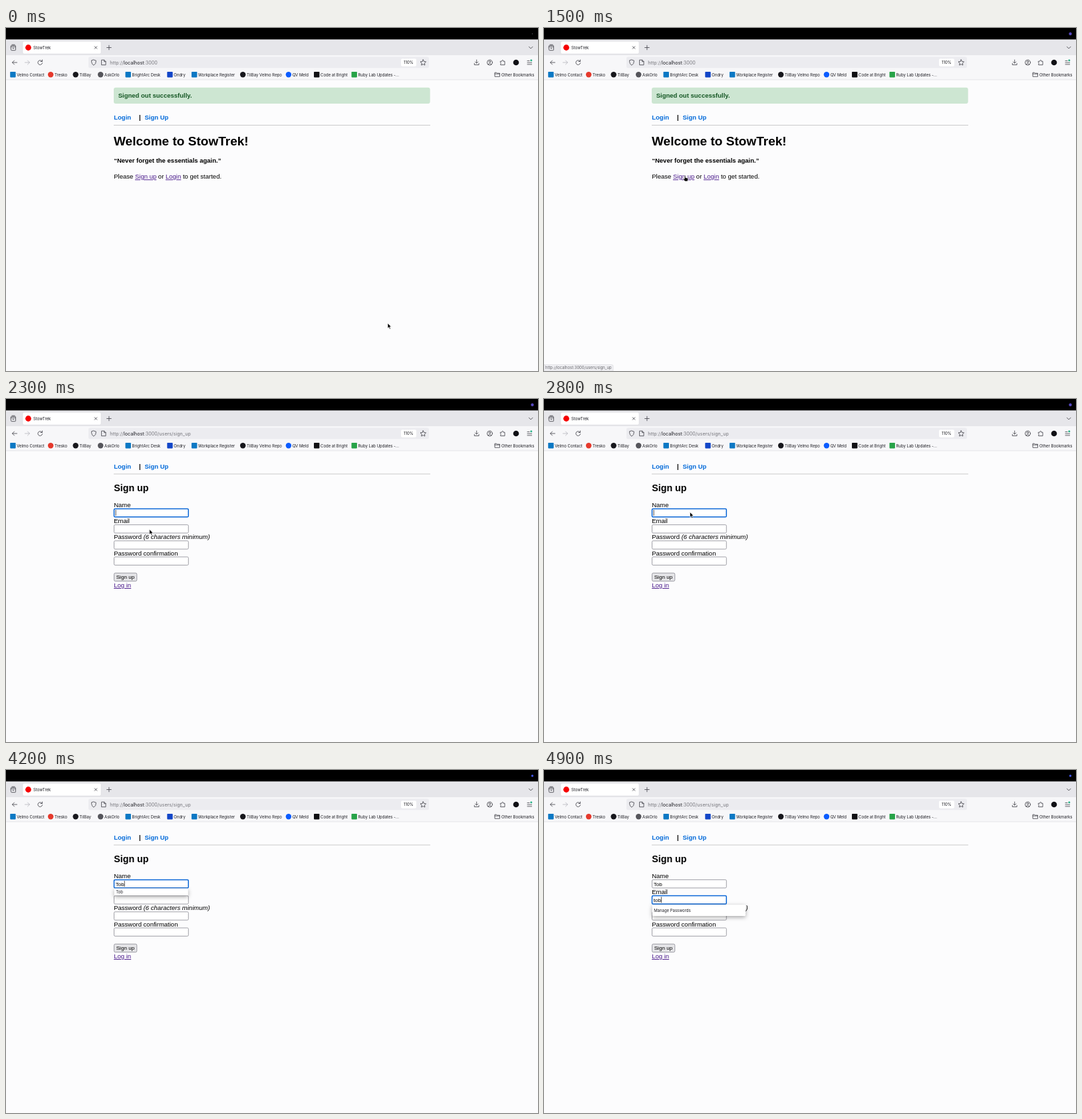
Write an HTML page that moves like this. It is 800 by 517 pixels and loops after 5 s.

```html
<!DOCTYPE html>
<html lang="en">
<head>
<meta charset="utf-8">
<title>StowTrek</title>
<style>
  html, body { margin: 0; width: 100%; height: 100%; overflow: hidden; background: #fcfcfd; }
  svg { display: block; width: 800px; height: 517px; }
  text { white-space: pre; }
  .ui { font: 6px Inter, sans-serif; fill: #1c1c22; }
  .url { font-size: 7.2px; fill: #77777d; }
  .page { font: 9.52px "Liberation Sans", Arial, sans-serif; fill: #000; }
  .bold { font-weight: bold; }
  .nav { font-weight: bold; fill: #0069d9; }
  .link { fill: #4a1a8b; text-decoration: underline; }
  .small { font-size: 8.1px; }
  .icon { fill: none; stroke: #45454c; stroke-width: .85; stroke-linecap: round; stroke-linejoin: round; }
  .popup { filter: drop-shadow(0 2px 3px rgba(0, 0, 0, .35)); }
  .rule { stroke: #c4c4c6; stroke-width: .9; }
</style>
</head>
<body>
<svg viewBox="0 0 800 517">
  <rect width="800" height="517" fill="#fcfcfd"/>
  <rect width="800" height="17.5" fill="#000"/>
  <circle id="dot" cx="791.5" cy="8.7"/>
  <rect y="17.5" width="800" height="23.5" fill="#e6e6ea"/>
  <rect y="41" width="800" height="37" fill="#f7f7f9"/>
  <path d="M0 78H800" stroke="#dcdce0" stroke-width=".7"/>
  <rect x="25" y="20" width="118" height="19" rx="2.2" fill="#fff" stroke="#d4d4da" stroke-width=".5"/>
  <circle cx="33.5" cy="29.5" r="4.4" fill="#f60000"/>
  <rect x="124" y="43.5" width="512" height="16.7" rx="2.2" fill="#ececf0"/>
  <rect x="594" y="46.2" width="23" height="11.5" rx="2" fill="#fff"/>

  <g class="icon">
    <path d="M7.5 28.2h7v4.6q0 .9-.9.9h-5.2q-.9 0-.9-.9zM7.5 28.2v-1q0-.9.9-.9h5.2q.9 0 .9.9v1M9 25.2h4M10 30.5h2"/>
    <path d="M133.2 27.7l3.6 3.6m0-3.6l-3.6 3.6M151.6 29.5h6.6m-3.3-3.3v6.6M786.4 28.2l2.8 2.8 2.8-2.8"/>
    <path d="M16.5 52h-7m3-3l-3 3 3 3"/>
    <path d="M28.5 52h7m-3-3l3 3-3 3" stroke="#b8b8be"/>
    <path d="M54.2 50.2a3.4 3.4 0 1 0 .5 2.5M54.6 48v2.5h-2.5"/>
    <path d="M132 48l3.4 1.2q.3 5-3.4 7-3.7-2-3.4-7z"/>
    <path d="M144 48.2h3.7l2.3 2.3v5.2h-6zM147.6 48.3v2.3h2.3"/>
    <path d="M627.3 47.8l1.3 2.7 3 .4-2.2 2.1.5 3-2.6-1.4-2.6 1.4.5-3-2.2-2.1 3-.4z"/>
    <path d="M707.7 48v5m-2.1-2l2.1 2.1 2.1-2.1M704.3 53.3v2.2h6.8v-2.2"/>
    <circle cx="727.5" cy="52" r="4"/>
    <circle cx="727.5" cy="50.8" r="1.3"/>
    <path d="M725 54.6q2.5-2.4 5 0"/>
    <path d="M743.7 50.2h2v-1q1.1-1.8 2.2 0v1h2.1v5.4h-6.3v-1.8q2-.8 0-1.7z"/>
    <path d="M784 49.5h3m-3 2.7h6.6m-6.6 2.7h6.6"/>
    <path d="M735 72.8v-5.6h2.6l.9 1h4v4.6zM735 69.2h7.4"/>
  </g>
  <circle cx="767" cy="52" r="4.3" fill="#111116"/>
  <circle cx="789.8" cy="48.7" r="1.5" fill="#2cb58a"/>

  <g class="ui">
    <text x="41" y="31.7">StowTrek</text>
    <text class="url" x="156.3" y="54.6">http://<tspan fill="#1c1c22">localhost</tspan>:3000<tspan id="path"></tspan></text>
    <text x="598" y="54.2">110%</text>
    <text x="745" y="72.6">Other Bookmarks</text>
    <g id="bookmarks"></g>
  </g>

  <g id="home" class="page">
    <rect x="162" y="89.7" width="475.7" height="24.3" rx="3" fill="#cde6d2"/>
    <text x="168.7" y="105" class="bold" fill="#155724" style="fill:#155724">Signed out successfully.</text>
    <text x="162.2" y="137.8" class="nav">Login</text>
    <text x="200" y="137.8" class="bold">|</text>
    <text x="208.4" y="137.8" class="nav">Sign Up</text>
    <path class="rule" d="M162 146.5H638"/>
    <text x="162" y="177" class="bold" style="font-size:19.04px">Welcome to StowTrek!</text>
    <text x="162.2" y="203.2" class="bold">“Never forget the essentials again.”</text>
    <text x="162.2" y="227.3">Please <tspan class="link">Sign up</tspan> or <tspan class="link">Login</tspan> to get started.</text>
  </g>

  <g id="form" class="page">
    <text x="162.2" y="104.5" class="nav">Login</text>
    <text x="200" y="104.5" class="bold">|</text>
    <text x="208.4" y="104.5" class="nav">Sign Up</text>
    <path class="rule" d="M162 113H638"/>
    <text x="162.2" y="138.6" class="bold" style="font-size:14.28px">Sign up</text>
    <g id="fields"></g>
    <rect x="162.5" y="262.3" width="34.3" height="12.3" rx="2" fill="#e4e4e7" stroke="#8a8a92" stroke-width=".8"/>
    <text x="165.7" y="271.4" class="small">Sign up</text>
    <text x="162.2" y="284" class="link">Log in</text>
    <path id="caret" stroke="#000" stroke-width=".7"/>
    <g id="popup" class="ui popup"></g>
  </g>

  <g id="status" class="ui">
    <path d="M0 507.5H102q2 0 2 2V517H0z" fill="#f0f0f3" stroke="#d0d0d5" stroke-width=".5"/>
    <text x="2" y="514.3" style="font-size:5.9px;fill:#66666c">http://localhost:3000/users/sign_up</text>
  </g>

  <g id="cursor">
    <path id="arrow" d="M0 0V7.6L1.8 6 3 8.9 4.3 8.3 3.1 5.5H5.4z" fill="#000" stroke="#fff" stroke-width=".6"/>
    <path id="hand" d="M-.8 0q.8-1 1.6 0v3l3 .7q1 .4.8 1.6l-.7 3.2h-4L-2.8 5q0-1.2 2 0z" fill="#000" stroke="#fff" stroke-width=".6"/>
    <path id="beam" d="M-1.7-4Q0-4 0-3 0-4 1.7-4M0-3V4M-1.7 5Q0 5 0 4 0 5 1.7 5M-.9 1.6H.9" fill="none" stroke="#222" stroke-width=".8"/>
  </g>
</svg>
<script>
const LOOP = 5000, STEP = 100;
const $ = id => document.getElementById(id);
const show = (id, on) => $(id).style.display = on ? '' : 'none';

// label, text x, icon colour, round icon
const bookmarks = [
  ['Velmo Contact', 16.2, '#0c78c4'], ['Tresko', 73, '#e5392c', 1],
  ['TilBay', 110.5, '#17171c', 1], ['AskOrlo', 148, '#55555b', 1],
  ['BrightArc Desk', 189.5, '#0c78c4'], ['Ondry', 252.3, '#1246c8'],
  ['Workplace Register', 289, '#0c78c4'], ['TilBay Velmo Repo', 362, '#17171c', 1],
  ['QV Meld', 430.7, '#0b5cff', 1], ['Code at Bright', 473, '#111114'],
  ['Ruby Lab Updates -…', 529.5, '#27a348']
];
$('bookmarks').innerHTML = bookmarks.map(([label, x, color, round]) =>
  `<rect x="${x - 10}" y="66" width="8.4" height="8.4" rx="${round ? 4.2 : .8}" fill="${color}"/>
   <text x="${x}" y="72.6">${label}</text>`).join('');

const rowStep = 24.2;
const labels = ['Name', 'Email',
  'Password <tspan font-style="italic">(6 characters minimum)</tspan>', 'Password confirmation'];
$('fields').innerHTML = labels.map((label, i) => {
  const y = 163 + i * rowStep;
  return `<text x="162.2" y="${y}">${label}</text>
    <rect class="box" x="162.5" y="${y + 2.4}" width="111.8" height="12.4" rx="1.6" fill="#fff"/>
    <text class="small value" x="164.8" y="${y + 11.6}"></text>`;
}).join('');
const boxes = document.querySelectorAll('.box');
const values = document.querySelectorAll('.value');

const heroes = ['Dusker', 'Orsie', 'Tovy', 'Doril', 'Silver Matron', 'Tob'];

function drawPopup(items, y, width, rowHeight) {
  const rows = items.map((item, i) =>
    `<text x="165.2" y="${y + rowHeight * (i + .5) + 2.1}">${item}</text>`).join('');
  $('popup').innerHTML = items.length
    ? `<rect x="162.8" y="${y}" width="${width}" height="${rowHeight * items.length}" rx="1.5" fill="#fff"/>${rows}` : '';
}

// time, x, y of the pointer
const path = [[0, 574, 445], [500, 264, 252], [700, 263, 253], [800, 265.2, 249.7],
  [1400, 212, 222.5], [2000, 212, 222.5], [2600, 219.5, 170.5], [5000, 219.5, 170.5]];
function pointer(t) {
  const i = path.findIndex(p => p[0] > t);
  const [t0, x0, y0] = path[i - 1], [t1, x1, y1] = path[i];
  const u = (t - t0) / (t1 - t0), k = u * u * (3 - 2 * u);
  return [x0 + (x1 - x0) * k, y0 + (y1 - y0) * k];
}

const typed = (word, t, start) => word.slice(0, Math.max(0, (t - start) / STEP + 1));

function draw(t) {
  const signUp = t >= 1600, email = t >= 4400;
  show('home', !signUp);
  show('form', signUp);
  show('status', t >= 1400 && t < 1900);
  $('path').textContent = signUp ? '/users/sign_up' : '';

  $('dot').setAttribute('r', t < 100 ? .7 : t < 3200 ? 2.2 : 1.7);
  $('dot').setAttribute('fill', t < 100 ? '#55555c' : t < 3200 ? '#5648c0' : '#4054e8');

  const focus = email ? 1 : 0;
  boxes.forEach((box, i) => {
    box.setAttribute('stroke', i === focus ? '#0a66d6' : '#8a8a92');
    box.setAttribute('stroke-width', i === focus ? 1.5 : .8);
  });
  values[0].textContent = typed('Tob', t, 3900);
  values[1].textContent = typed('tob', t, 4700);

  const value = values[focus];
  const caretX = 165.1 + (signUp && value.textContent ? value.getComputedTextLength() : 0);
  $('caret').setAttribute('d', `M${caretX} ${167 + focus * rowStep}v9`);
  show('caret', t < 3200 || t >= 3900);

  if (email) drawPopup(t >= 4500 ? ['Manage Passwords'] : [], 203, 140.3, 17);
  else if (t >= 3200) drawPopup(heroes.filter(h => h.startsWith(values[0].textContent)), 178.6, 111, 10.66);
  else drawPopup([], 0, 0, 0);

  const [x, y] = pointer(t);
  const hand = t >= 1400 && t < 1600, beam = t >= 1600 && t < 2100;
  $('cursor').setAttribute('transform', `translate(${x} ${y})`);
  show('cursor', t < 3200);
  show('hand', hand);
  show('beam', beam);
  show('arrow', !hand && !beam);
}

const start = performance.now();
function tick() {
  const t = (performance.now() - start) % LOOP;
  draw(Math.floor(t / STEP) * STEP);
  requestAnimationFrame(tick);
}
tick();
</script>
</body>
</html>
```
